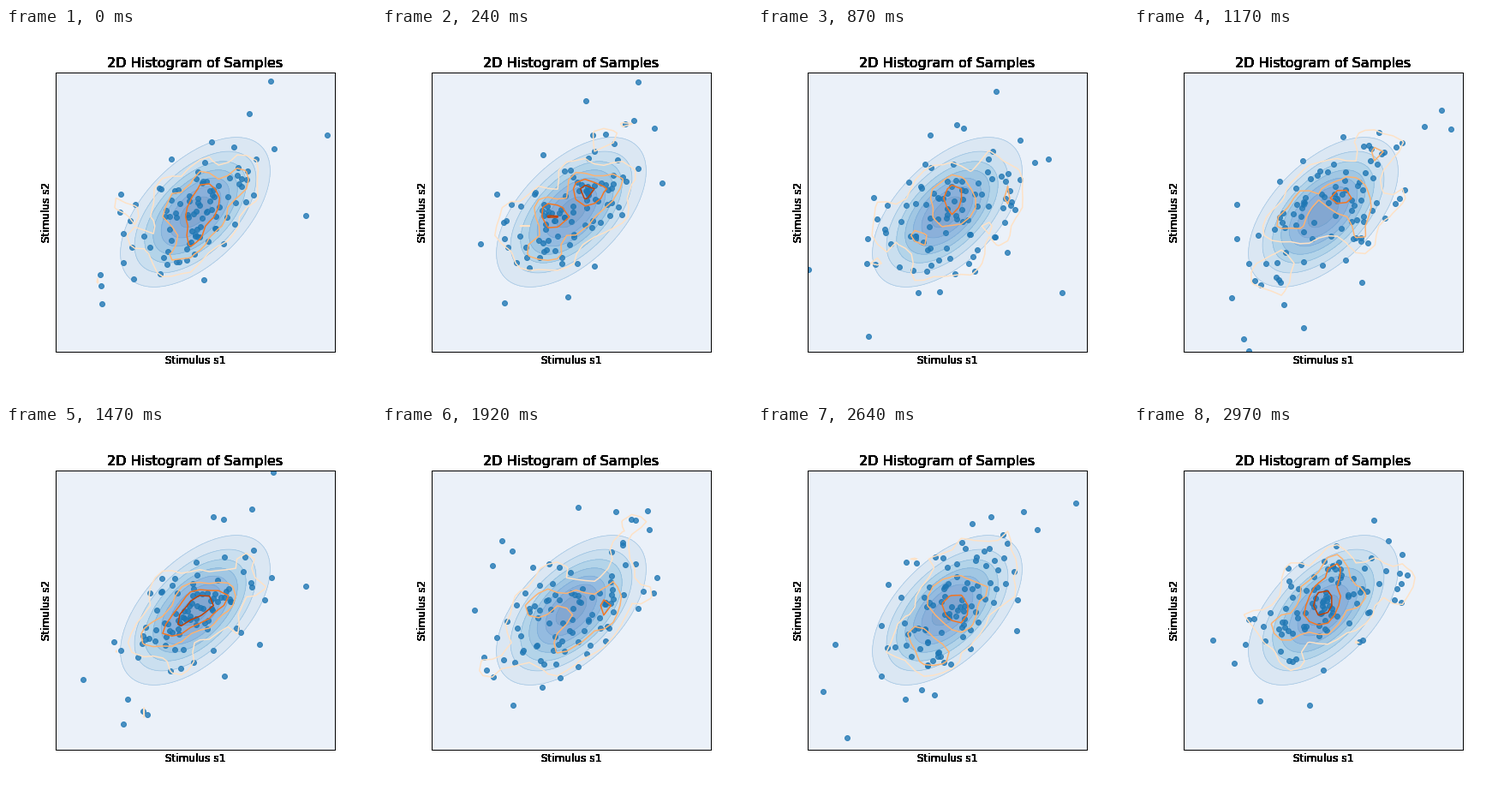
Write a matplotlib script that moves like this. It is 432 px wide and 432 px high and loops after 3000 ms.

```python
import numpy as np
import matplotlib.pyplot as plt
from matplotlib.animation import FuncAnimation
from matplotlib.colors import LinearSegmentedColormap

SIZE, DPI = 432, 72
FRAMES, INTERVAL = 100, 30
WINDOW, STRIDE = 100, 10      # samples on show, new samples per frame
LIM, BINS = 3.76, 30
RHO = 0.55                    # correlation of the two stimuli
OVERPRINT = 15                # text is stamped repeatedly, which makes it heavy


def make_chain(seed=11, keep=0.35, dof=9):
    """Autocorrelated, slightly heavy-tailed chain of 2D samples."""
    rng = np.random.default_rng(seed)
    n = WINDOW + STRIDE * FRAMES
    z = rng.standard_normal((n, 2))
    for i in range(1, n):
        z[i] = keep * z[i - 1] + np.sqrt(1 - keep ** 2) * z[i]
    z *= np.sqrt(dof / rng.chisquare(dof, (n, 1)))
    return z @ np.array([[1, RHO], [0, np.sqrt(1 - RHO ** 2)]])


def smooth(h, sigma=1.0):
    k = np.arange(-4, 5)
    w = np.exp(-k ** 2 / (2 * sigma ** 2))
    w /= w.sum()
    for axis in (0, 1):
        h = np.apply_along_axis(np.convolve, axis, h, w, mode="same")
    return h


def stamp(text, anchor, offset, size, **style):
    for _ in range(OVERPRINT):
        ax.annotate(text, anchor, xycoords="axes fraction", xytext=offset,
                    textcoords="offset points", fontsize=size, ha="center", **style)


chain = make_chain()
edges = np.linspace(-LIM, LIM, BINS + 1)
mids = (edges[1:] + edges[:-1]) / 2

fig = plt.figure(figsize=(SIZE / DPI, SIZE / DPI), dpi=DPI, facecolor="white")
ax = fig.add_axes([58 / SIZE, 54 / SIZE, 326 / SIZE, 326 / SIZE])
ax.set(xlim=(-LIM, LIM), ylim=(-LIM, LIM), xticks=[], yticks=[])
for spine in ax.spines.values():
    spine.set_linewidth(1)

stamp("2D Histogram of Samples", (0.5, 1), (0, 6), 16, va="baseline")
stamp("Stimulus s1", (0.5, 0), (0, -4), 12, va="top")
stamp("Stimulus s2", (0, 0.5), (-4, 0), 12, va="bottom",
      rotation=90, rotation_mode="anchor")

# True density
g = np.linspace(-LIM, LIM, 201)
X, Y = np.meshgrid(g, g)
det = 1 - RHO ** 2
pdf = np.exp(-(X ** 2 - 2 * RHO * X * Y + Y ** 2) / (2 * det)) / (2 * np.pi * np.sqrt(det))
levels = np.arange(0, 0.21, 0.025)
blues = LinearSegmentedColormap.from_list(
    "blues", ["#f4f7fc", "#e0eaf5", "#cfe2f0", "#b4d5e9",
              "#a0c6e3", "#92b9df", "#88add8", "#80a2cc"])
ax.contourf(X, Y, pdf, levels=levels, cmap=blues)
ax.contour(X, Y, pdf, levels=levels[1:], colors="#5b9bd0", linewidths=0.7, alpha=0.45)

dots = ax.scatter([], [], s=36, color="C0", alpha=0.8, zorder=1.5)
lines = None


def update(frame):
    global lines
    pts = chain[frame * STRIDE:frame * STRIDE + WINDOW]
    dots.set_offsets(pts)
    if lines is not None:
        lines.remove()
    hist = np.histogram2d(pts[:, 1], pts[:, 0], bins=(edges, edges))[0]
    lines = ax.contour(mids, mids, smooth(hist), levels=[0.27, 0.65, 1.05, 1.45],
                       cmap="Oranges", vmin=0, vmax=1.8, linewidths=1.5, zorder=2)
    return dots, lines


anim = FuncAnimation(fig, update, frames=FRAMES, interval=INTERVAL,
                     init_func=lambda: (dots,), repeat=True, repeat_delay=0, blit=False)
plt.show()
```
